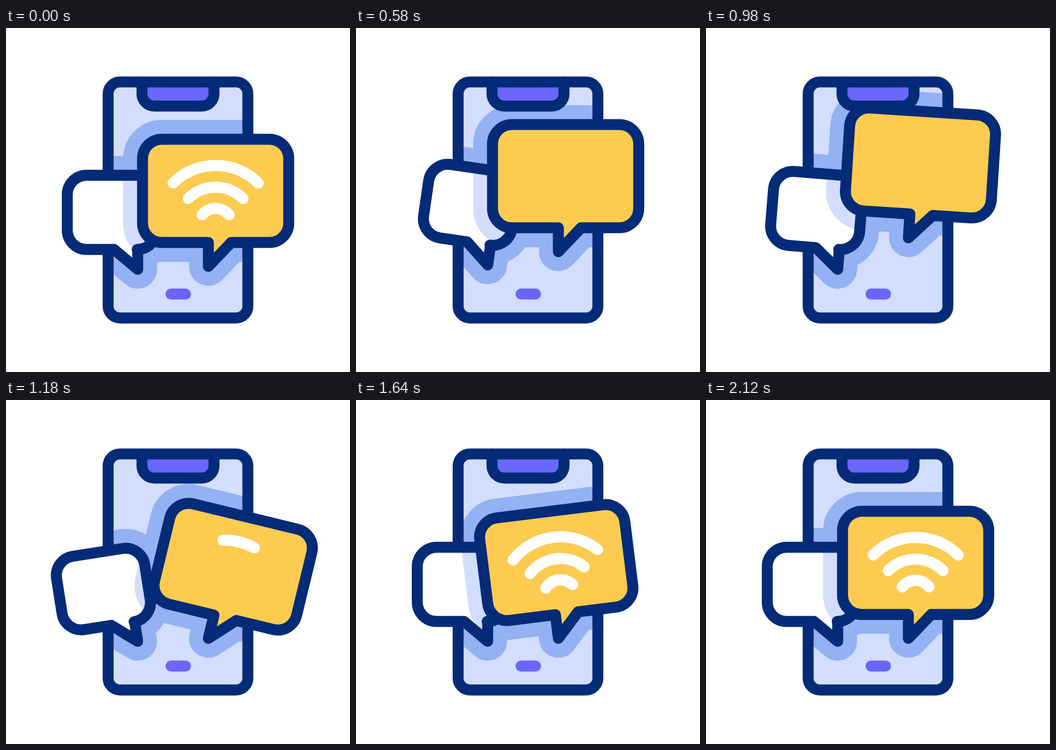
Recreate the animation shown at these times as an HTML page with a canvas. Size 640 px wide and 640 px high, loop 2.4 s.

```html
<!DOCTYPE html>
<html>
<head>
<meta charset="utf-8">
<style>
html, body { margin: 0; width: 100%; height: 100%; overflow: hidden; background: #fff; }
canvas { display: block; }
</style>
</head>
<body>
<canvas id="stage" width="640" height="640"></canvas>
<script>
const ctx = document.getElementById('stage').getContext('2d');
const LOOP = 2400, STEP = 20, LAG = 500;
const NAVY = '#032b77', LIGHT = '#d3ddfe', MID = '#93b1f3', PURPLE = '#6a66fa', YELLOW = '#fdcb50';

const phone = new Path2D('M212 100.4H428a22 22 0 0 1 22 22V517.5a22 22 0 0 1-22 22H212a22 22 0 0 1-22-22V122.4a22 22 0 0 1 22-22z');
const screen = new Path2D('M200 110H440V530H200z');
const notch = new Path2D('M253 100.4V122.3a23 23 0 0 0 23 23H364a23 23 0 0 0 23-23V100.4');
const pill = new Path2D('M307 495H334');

// Each bubble turns about the tip of its tail.
const white = {
  path: new Path2D('M150 274H244a36 36 0 0 1 36 36V376a36 36 0 0 1-36 36H245V449L201 412H150a36 36 0 0 1-36-36V310a36 36 0 0 1 36-36z'),
  x: 245, y: 449, delay: 0
};
const yellow = {
  path: new Path2D('M290 207H490a36 36 0 0 1 36 36V363a36 36 0 0 1-36 36H419L376.5 443.5V399H290a36 36 0 0 1-36-36V243a36 36 0 0 1 36-36z'),
  x: 376.5, y: 443.5, delay: LAG
};

// [time, value] keys of the hop and of the swing that follows
const hop = [[0, 0], [170, -60], [442, -60], [622, 0]];
const swing = [[370, 0], [480, 3.7], [580, 8.2], [760, 16], [1240, -10], [1408, 6.1], [1610, 0]];

// Smooth curve through the keys, flat at every turning point
function curve(keys, t) {
  const last = keys.length - 1;
  if (t <= keys[0][0]) return keys[0][1];
  if (t >= keys[last][0]) return keys[last][1];
  const slope = k => {
    if (k === 0 || k === last) return 0;
    const [a, b, c] = keys.slice(k - 1, k + 2);
    return (b[1] - a[1]) * (c[1] - b[1]) <= 0 ? 0 : (c[1] - a[1]) / (c[0] - a[0]);
  };
  const i = keys.findIndex(k => k[0] > t) - 1;
  const [t0, v0] = keys[i], [t1, v1] = keys[i + 1];
  const d = t1 - t0, u = (t - t0) / d, s = u * u * (3 - 2 * u);
  return v0 + (v1 - v0) * s + d * u * (1 - u) * ((1 - u) * slope(i) - u * slope(i + 1));
}

function ease(t, start, length) {
  const u = Math.min(1, Math.max(0, (t - start) / length));
  return (1 - Math.cos(Math.PI * u)) / 2;
}

function pose(bubble, t) {
  const local = t - bubble.delay;
  const m = new DOMMatrix()
    .translate(bubble.x, bubble.y + curve(hop, local))
    .rotate(curve(swing, local))
    .translate(-bubble.x, -bubble.y);
  const shape = new Path2D();
  shape.addPath(bubble.path, m);
  return { m, shape };
}

function stroke(path, color, width = 20.4) {
  ctx.strokeStyle = color;
  ctx.lineWidth = width;
  ctx.stroke(path);
}

function fill(path, color) {
  ctx.fillStyle = color;
  ctx.fill(path);
}

function clipped(path, paint) {
  ctx.save();
  ctx.clip(path);
  paint();
  ctx.restore();
}

function halo(shape, color) {
  fill(shape, color);
  stroke(shape, color, 72);
}

function signal(t, m) {
  ctx.save();
  ctx.transform(m.a, m.b, m.c, m.d, m.e, m.f);
  [[112, 0.785], [71.5, 0.79], [32, 0.9]].forEach(([r, half], i) => {
    const part = 1 - ease(t, i * 100, 200) + ease(t, 1100 + i * 100, 200);
    if (part < 0.001) return;
    const arc = new Path2D();
    arc.arc(390, 367.6, r, -Math.PI / 2 - half * part, -Math.PI / 2 + half * part);
    stroke(arc, '#fff', 20.8);
  });
  ctx.restore();
}

function draw(t) {
  const back = pose(white, t), front = pose(yellow, t);
  ctx.fillStyle = '#fff';
  ctx.fillRect(0, 0, 640, 640);

  fill(phone, LIGHT);
  clipped(screen, () => {
    halo(back.shape, MID);
    halo(front.shape, MID);
  });
  stroke(pill, PURPLE);
  fill(notch, PURPLE);
  stroke(notch, NAVY);
  stroke(phone, NAVY);

  fill(back.shape, '#fff');
  clipped(back.shape, () => halo(front.shape, LIGHT));
  stroke(back.shape, NAVY);

  fill(front.shape, YELLOW);
  stroke(front.shape, NAVY);
  signal(t, front.m);
}

ctx.lineCap = ctx.lineJoin = 'round';
const begin = performance.now();
function tick() {
  const t = (performance.now() - begin) % LOOP;
  draw(t - t % STEP);
  requestAnimationFrame(tick);
}
tick();
</script>
</body>
</html>
```
